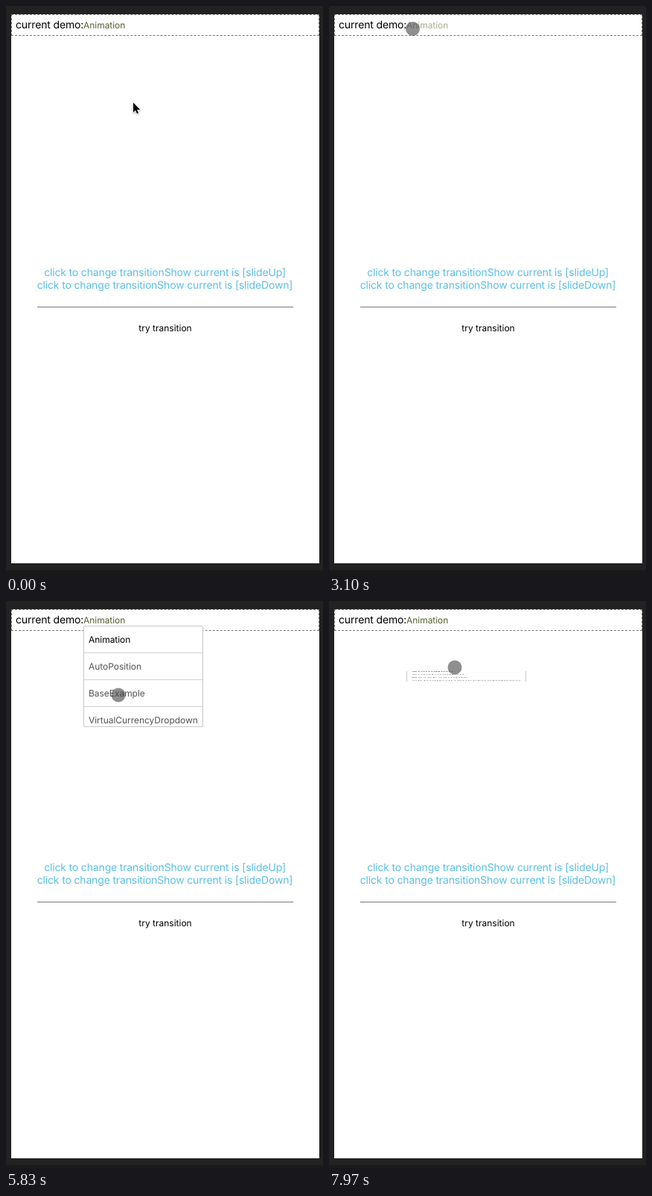
These frames come from a looping animation (426x760 px, 8000 ms). An HTML page:

```html
<!DOCTYPE html>
<html lang="en">
<head>
<meta charset="utf-8">
<title>Dropdown demo</title>
<style>
  html, body { margin: 0; width: 100%; height: 100%; overflow: hidden; background: #222223; }
  body {
    position: relative; color: #000;
    font-family: Inter, Roboto, sans-serif; text-rendering: geometricPrecision;
  }
  body > * { position: absolute; box-sizing: border-box; }
  .page { left: 7px; top: 11px; width: 414px; height: 736px; background: #fff; }
  .base { left: 0; top: 756px; width: 426px; height: 4px; background: #1a1a1b; }
  .bar { left: 7px; top: 11px; width: 414px; height: 29px; border: 1px dashed #777; }
  .rule { left: 42px; top: 403px; width: 344px; height: 1px; background: #777; }
  .text { line-height: 20px; height: 20px; white-space: nowrap; }
  .big { font-size: 14px; letter-spacing: -0.16px; }
  .small { font-size: 12px; }
  .mid { left: 0; width: 427px; text-align: center; }
  .link { color: #5bbfe4; }
  #value { left: 104px; top: 16px; color: #536030; letter-spacing: -0.04px; }
  #menu {
    --line: 1;
    left: 104px; top: 33px; width: 161px; height: 136px;
    border: 1px solid #c8c8c8; border-radius: 2px;
    border-block-color: rgba(200, 200, 200, var(--line));
    background: #fff; overflow: hidden;
  }
  .item {
    height: 36px; box-sizing: border-box; padding-left: 6px;
    border-bottom: 1px solid #d0d0d0; letter-spacing: -0.04px;
    font-size: 12px; line-height: 35px; color: #555; white-space: nowrap;
  }
  .item:first-child { color: #000; }
  #touch {
    left: -9.5px; top: -9.5px; width: 19px; height: 19px; border-radius: 50%;
    background: rgba(60, 60, 60, .58);
  }
  #arrow {
    left: 0; top: 0; overflow: visible;
    filter: drop-shadow(0 1px 1px rgba(0, 0, 0, .35));
  }
</style>
</head>
<body>
<div class="page"></div>
<div class="base"></div>
<div class="bar"></div>
<div class="text big" style="left:13px; top:16px">current demo:</div>
<div class="text small" id="value">Animation</div>
<div class="text big mid link" style="top:348px">click to change transitionShow current is [slideUp]</div>
<div class="text big mid link" style="top:365px">click to change transitionShow current is [slideDown]</div>
<div class="rule"></div>
<div class="text small mid" style="top:422px; width:428px">try transition</div>
<div id="menu">
  <div id="list">
    <div class="item">Animation</div>
    <div class="item" id="pressed">AutoPosition</div>
    <div class="item">BaseExample</div>
    <div class="item">VirtualCurrencyDropdown</div>
  </div>
</div>
<div id="touch"></div>
<svg id="arrow" width="12" height="18">
  <path d="M0 0V13L3 10.2L5 14.8L7 13.9L5.1 9.4H9.2Z"
        fill="#000" stroke="#fff" stroke-width="1.4" stroke-linejoin="round" paint-order="stroke"/>
</svg>
<script>
const LOOP = 8000;
const TOUCH_START = 2300;
const SCROLL = 11;
const [value, menu, list, pressed, touch, arrow] =
  ['value', 'menu', 'list', 'pressed', 'touch', 'arrow']
    .map(id => document.getElementById(id));

const span = (t, from, to) => Math.min(1, Math.max(0, (t - from) / (to - from)));
const ease = (t, from, to) => {
  const p = span(t, from, to);
  return p * p * (3 - 2 * p);
};
const pulse = (t, from, to) => Math.sin(Math.PI * span(t, from, to));

const place = (node, x, y) => { node.style.transform = `translate(${x}px, ${y}px)`; };
const show = (node, on) => { node.style.visibility = on ? 'visible' : 'hidden'; };

// The arrow goes up to the label, then sways sideways over it.
function arrowAt(t) {
  const rise = ease(t, 0, 830);
  const drift = ease(t, 1630, 2000);
  return [
    171 - 48 * rise + 9 * pulse(t, 930, 1070) + 10 * drift,
    129.5 - 104.5 * rise - drift
  ];
}

// The finger goes to the label, along it, down to a row, drags the list, and leaves.
function touchAt(t) {
  const reach = ease(t, 2300, 2560);
  const along = ease(t, 3860, 4270);
  const down = ease(t, 4690, 5130);
  const pull = ease(t, 5560, 5830);
  const push = ease(t, 6260, 6430);
  const leave = ease(t, 6660, 7300);
  return [
    149 - 37 * reach + 35 * along - 9 * down + 12.5 * pull + 1.5 * push
      + 16.5 * leave + 9 * pulse(t, 6800, 7300),
    27 + 3 * reach + along + 46 * down + 48.5 * pull - 14 * push - 23 * leave
  ];
}

function draw(t) {
  const touching = t >= TOUCH_START;
  show(arrow, !touching);
  show(touch, touching);
  place(arrow, ...arrowAt(t));
  place(touch, ...touchAt(t));

  const open = span(t, 3160, 3470) - span(t, 7690, 8005);
  show(menu, open > 0);
  menu.style.transform = open < 1 ? `scaleY(${open})` : 'none';
  menu.style.setProperty('--line', open);
  place(list, 0, SCROLL * (ease(t, 5560, 5760) - ease(t, 6260, 6430) - 1));
  pressed.style.background = t >= 5330 && t < 5570 ? '#eee' : '';
  value.style.opacity = 1 - .6 * pulse(t, 2920, 3180);
}

function tick() {
  draw(performance.now() % LOOP);
  requestAnimationFrame(tick);
}
tick();
</script>
</body>
</html>
```
